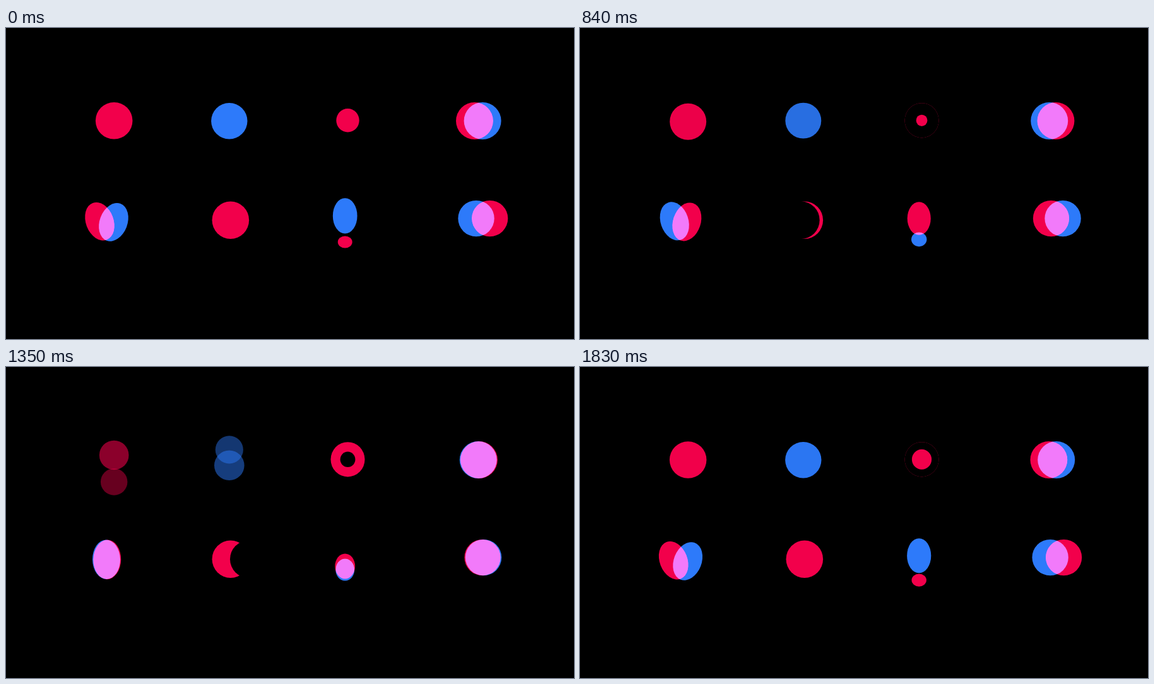
An HTML page with a canvas for the animation above (1.86 s loop, 900 by 494 pixels).

```html
<!DOCTYPE html>
<html>
<head>
<meta charset="utf-8">
<title>Dot loaders</title>
<style>
html, body { margin: 0; width: 100%; height: 100%; overflow: hidden; background: #000; }
canvas { display: block; }
</style>
</head>
<body>
<canvas id="stage" width="900" height="494"></canvas>
<script>
const ctx = document.getElementById('stage').getContext('2d');
const RED = '#f2004b', BLUE = '#2d7afa';
const STEP = 30, HALF = 930, LOOP = 2 * HALF;

function oval(x, y, rx, ry, color, alpha = 1, angle = 0) {
  if (rx <= 0 || alpha <= 0) return;
  ctx.globalAlpha = alpha;
  ctx.fillStyle = color;
  ctx.beginPath();
  ctx.ellipse(x, y, rx, ry, angle, 0, 2 * Math.PI);
  ctx.fill();
  ctx.globalAlpha = 1;
}

// Triangle wave: 1 at t = 0, -1 after half a loop.
function swing(t) {
  const u = (t + LOOP) % LOOP;
  return 1 - 2 * Math.min(u, LOOP - u) / HALF;
}

const ease = k => (1 - Math.cos(Math.PI * k)) / 2;

// One dot leaves upwards while the next rises from below.
function rising(t, k) {
  const e = ease(k);
  const dot = (y, r, alpha) => oval(171.2, y, r, r, RED, alpha);
  ctx.save();
  if (t < HALF) {
    ctx.beginPath();
    ctx.rect(120, 90, 110, 88);
    ctx.clip();
  }
  dot(147.3 - 7.4 * Math.sin(Math.PI * k), 29.3 - 14 * e, 1 - e);
  dot(208.3 - 61 * e, 15.3 + 14 * e, e);
  ctx.restore();
}

// One dot sinks away while the next drops in from above.
function dropping(k) {
  const e = ease(k);
  const dot = (y, r, alpha) => oval(353.8, y, r, r, BLUE, alpha);
  dot(147.7 + 19 * k, 28.7 - 11.5 * e, 1 - 1.1 * k);
  dot(119.3 + 28.5 * e, 17.2 + 11.5 * e, k);
}

// A disc grows, a hole eats it, and the next disc starts inside the hole.
function ring(p) {
  const start = 780, full = 27;
  const disc = (r, color) => oval(541.5, 146.8, r, r * 1.025, color);
  const late = p >= start;
  const age = late ? p - start : p - start + HALF;
  const r = full * (1 - (1 - Math.min(1, age / 480)) ** 3);
  disc(late ? full : r, RED);
  disc(Math.min(full, .0395 * (p - 118)), '#000');
  if (late) disc(r, RED);
}

function sliding(x, y, r, shift) {
  oval(x - shift, y, r, r, RED);
  oval(x + shift, y, r, r, BLUE);
}

// Ovals rocking about a pivot near their lower tip.
function rocking(t) {
  const angle = 21.6 * Math.PI / 180 * swing(t + 20);
  const tilt = (a, color) => {
    const c = Math.cos(a), s = Math.sin(a);
    oval(157.9 + 1.7 * c + 31 * s, 336.8 + 1.7 * s - 31 * c, 22, 31.3, color, 1, a);
  };
  tilt(-angle, RED);
  tilt(angle, BLUE);
}

function moon(t) {
  oval(355.8, 305.2, 29.3, 29.8, RED);
  oval(294.5 + .0665 * t, 305.2, 29.3, 29.8, '#000');
}

// Balls trade places, shrinking as they sink.
function bobbing(t) {
  const shift = 21.5 * swing(t - 15);
  const ball = (dy, color) => oval(537.2, 319.2 + dy, 15.4 - .19 * dy, 18.8 - .45 * dy, color);
  ball(-shift, BLUE);
  ball(shift, RED);
}

function draw() {
  const t = Math.floor(performance.now() / STEP) * STEP % LOOP;
  const p = t % HALF, k = p / HALF;
  ctx.globalCompositeOperation = 'source-over';
  ctx.fillStyle = '#000';
  ctx.fillRect(0, 0, 900, 494);
  rising(t, k);
  dropping(k);
  ring(p);
  moon(t);
  ctx.globalCompositeOperation = 'lighten';
  sliding(748.8, 147.5, 29.5, 6.3 * swing(t));
  sliding(755.8, 302.6, 28.7, -11.1 * swing(t + 13));
  rocking(t);
  bobbing(t);
  requestAnimationFrame(draw);
}
draw();
</script>
</body>
</html>
```
